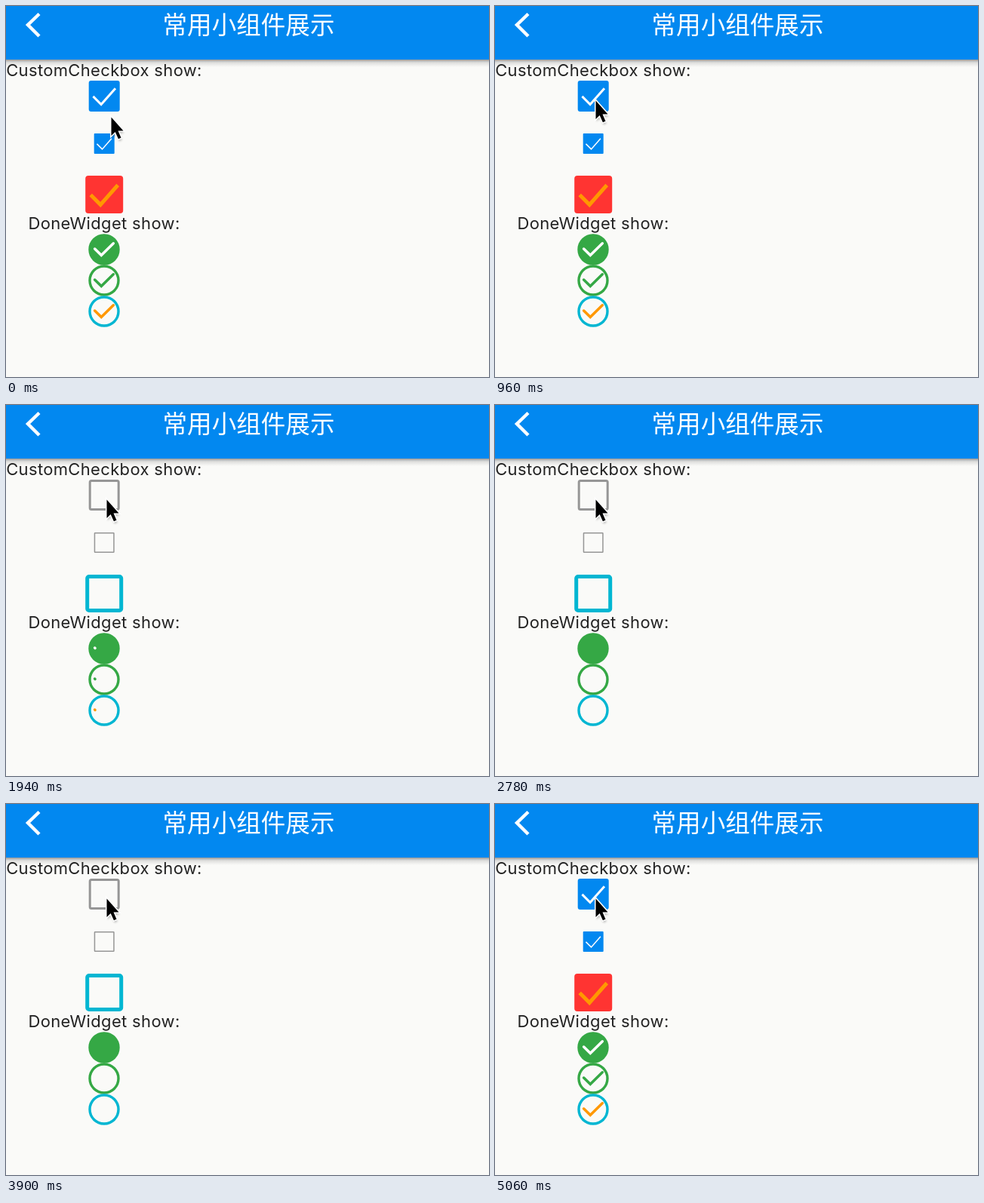
Recreate the animation shown at these times as an HTML page. Size 640x492 px, loop 5160 ms.

```html
<!DOCTYPE html>
<html lang="zh">
<head>
<meta charset="utf-8">
<title>常用小组件展示</title>
<style>
  html, body { margin: 0; width: 100%; height: 100%; overflow: hidden; background: #fafaf8; }
  svg { display: block; width: 100vw; height: 100vh; }
  text { text-anchor: middle; }
  .title { font: 500 32.6px "Noto Sans CJK SC", "Noto Sans CJK", sans-serif; fill: #fff; }
  .label { font: 400 22px Inter, sans-serif; letter-spacing: .34px; fill: #222; }
  .line { fill: none; }
</style>
</head>
<body>
<svg viewBox="0 0 640 492">
  <defs>
    <linearGradient id="shade" x2="0" y2="1">
      <stop offset="0" stop-color="#555" stop-opacity=".6"/>
      <stop offset=".4" stop-color="#777" stop-opacity=".22"/>
      <stop offset="1" stop-color="#888" stop-opacity="0"/>
    </linearGradient>
    <filter id="blur" x="-50%" y="-50%" width="200%" height="200%">
      <feGaussianBlur stdDeviation="1.6"/>
    </filter>
    <path id="arrow" d="M0 0V24.5L5.2 19.4L9.4 28.8L13 27.3L9 18H16Z"/>
  </defs>
  <rect y="71" width="640" height="10" fill="url(#shade)"/>
  <rect width="640" height="71" fill="#0288f0"/>
  <path class="line" d="M44 10.5L29 25L44 40" stroke="#fff" stroke-width="4.4"/>
  <text class="title" x="321.5" y="37.2">常用小组件展示</text>
  <text class="label" x="130" y="92.5">CustomCheckbox show:</text>
  <text class="label" x="130" y="296">DoneWidget show:</text>
  <g id="widgets"></g>
  <g id="cursor">
    <use href="#arrow" x="1" y="3" fill="#000" opacity=".3" filter="url(#blur)"/>
    <use href="#arrow" fill="#000" stroke="#fff" stroke-width="3" style="paint-order:stroke"/>
  </g>
</svg>
<script>
const LOOP = 5160, DRAW = 800, UNCHECK = 1156, CHECK = 4096;
const BLUE = '#0288f0', GREEN = '#35a845', CYAN = '#00b6d2', ORANGE = '#ff9800', GREY = '#969696';
const widgets = document.getElementById('widgets');
const cursor = document.getElementById('cursor');
const clamp = x => Math.min(1, Math.max(0, x));
const mix = (a, b, p) => a + (b - a) * p;

function add(tag, attrs) {
  const el = document.createElementNS('http://www.w3.org/2000/svg', tag);
  for (const name in attrs) el.setAttribute(name, attrs[name]);
  return widgets.appendChild(el);
}

function checkbox(y, size, border, radius, fill, idle, mark) {
  const x = 130.2 - size / 2, top = y - size / 2;
  const at = (u, v) => `${x + size * u} ${top + size * v}`;
  const on = [
    add('rect', { x, y: top, width: size, height: size, rx: radius, fill }),
    add('path', {
      d: `M${at(.14, .51)}L${at(.4, .77)}L${at(.86, .25)}`,
      class: 'line', stroke: mark, 'stroke-width': border
    })
  ];
  const inner = size - border;
  const off = add('rect', {
    x: x + border / 2, y: top + border / 2, width: inner, height: inner,
    rx: Math.max(.5, radius - border / 3), class: 'line', stroke: idle, 'stroke-width': border
  });
  return checked => {
    on.forEach(el => el.style.display = checked ? '' : 'none');
    off.style.display = checked ? 'none' : '';
  };
}

function done(y, ring, fill, mark) {
  add('circle', { cx: 130, cy: y, r: 19, fill, stroke: ring, 'stroke-width': 3.4 });
  const tick = add('path', {
    d: `M117.6 ${y - 1}L126.3 ${y + 7.6}L142.3 ${y - 8.2}`, pathLength: 1,
    class: 'line', stroke: mark, 'stroke-width': 3.5, 'stroke-linecap': 'round'
  });
  return p => {
    tick.style.display = p > 0 ? '' : 'none';
    tick.setAttribute('stroke-dasharray', `${p} 2`);
  };
}

const boxes = [
  checkbox(119.5, 41, 3, 3, BLUE, GREY, '#fff'),
  checkbox(182.6, 27, 1.5, 1, BLUE, GREY, '#fff'),
  checkbox(250, 50, 5, 4, '#ff3432', CYAN, ORANGE)
];
const ticks = [
  done(323, GREEN, GREEN, '#fff'),
  done(364, GREEN, 'none', GREEN),
  done(405, CYAN, 'none', ORANGE)
];

function render(t) {
  const checked = t < UNCHECK || t >= CHECK;
  const p = t < CHECK ? 1 - clamp((t - UNCHECK) / DRAW) : clamp((t - CHECK) / DRAW);
  boxes.forEach(set => set(checked));
  ticks.forEach(set => set(p));
  const m = clamp(t / 560), ease = m * m * (3 - 2 * m);
  cursor.setAttribute('transform', `translate(${mix(139.5, 133.5, ease)} ${mix(147.5, 125.5, ease)})`);
}

const start = performance.now();
function frame() {
  render((performance.now() - start) % LOOP);
  requestAnimationFrame(frame);
}
frame();
</script>
</body>
</html>
```
